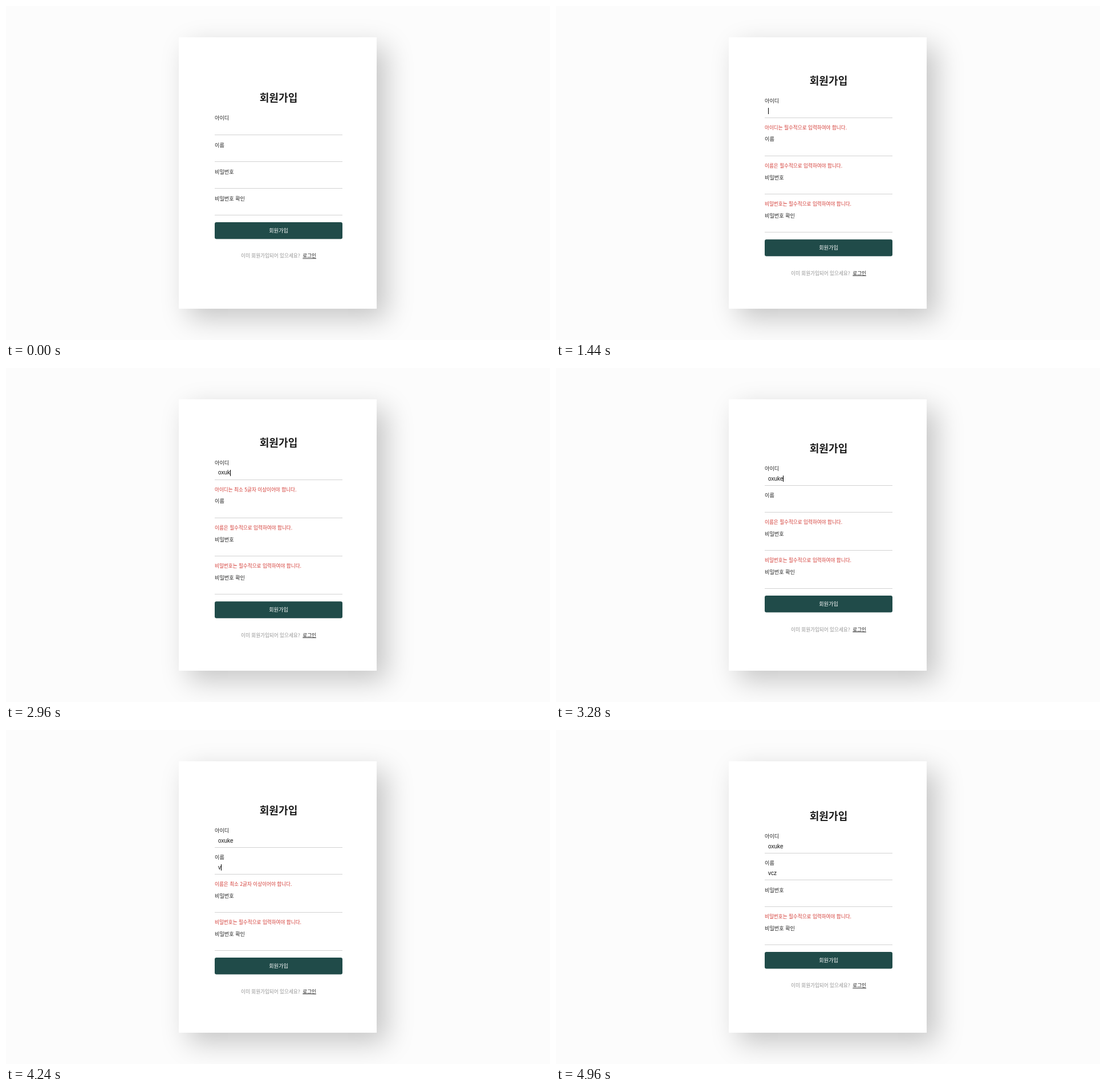
Write an HTML page that moves like this. It is 954x587 px and loops after 5520 ms.

```html
<!DOCTYPE html>
<html lang="ko">
<head>
<meta charset="utf-8">
<title>회원가입</title>
<style>
  html, body { margin: 0; width: 100%; height: 100%; overflow: hidden; background: #fcfcfc; }
  .card {
    position: absolute; left: 303px; top: 55px; width: 347px; height: 477px;
    background: #fff; box-shadow: 17px 17px 45px rgba(0, 0, 0, .22);
  }
  svg { position: absolute; left: 0; top: 0; }
  text { font: 400 8.6px "Noto Sans CJK KR", "Noto Sans CJK", sans-serif; white-space: pre; }
  .title { font-size: 18.1px; font-weight: 700; fill: #1c1c1c; text-anchor: middle; }
  .label { font-size: 9.15px; font-weight: 500; fill: #222; }
  .value { font: 10px "Liberation Sans", Arial, sans-serif; fill: #111; }
  .error { fill: #d33a34; }
  .rule { fill: #d2d2d2; }
  .button { fill: #204b49; }
  .submit { font-size: 9.15px; font-weight: 500; fill: #fff; text-anchor: middle; }
  .hint { fill: #939393; }
  .login { fill: #1c1c1c; text-decoration: underline; }
</style>
</head>
<body>
<div class="card"></div>
<svg width="954" height="587" viewBox="0 0 954 587"></svg>
<script>
const LOOP = 5520;
const LEFT = 366, WIDTH = 224, INSET = 372;
const PITCH = 47.2, ERROR_HEIGHT = 20.1;

const required = subject => subject + ' 필수적으로 입력하여야 합니다.';
const tooShort = (subject, n) => `${subject} 최소 ${n}글자 이상이어야 합니다.`;

const ID = 'oxuke', NAME = 'vcz';
const idEmpty = required('아이디는'), idShort = tooShort('아이디는', 5);
const nameEmpty = required('이름은'), nameShort = tooShort('이름은', 2);
const passEmpty = required('비밀번호는');

// Each step changes only the listed parts of the form.
const steps = [
  [0, { id: 0, name: 0, caret: -1, errors: ['', '', ''] }],
  [640, { errors: [idEmpty, nameEmpty, passEmpty] }],
  [1440, { caret: 0 }],
  [1920, { caret: -1 }],
  [2080, { id: 1, caret: 0, errors: [idShort, nameEmpty, passEmpty] }],
  [2400, { id: 2 }],
  [2720, { id: 3 }],
  [2960, { id: 4 }],
  [3280, { id: 5, errors: ['', nameEmpty, passEmpty] }],
  [3680, { caret: -1 }],
  [3920, { caret: 1 }],
  [4240, { name: 1, errors: ['', nameShort, passEmpty] }],
  [4400, { name: 2, errors: ['', '', passEmpty] }],
  [4560, { name: 3 }],
  [4960, { caret: -1 }]
];

const svg = document.querySelector('svg');

function add(tag, cls, attrs, content = '') {
  const el = document.createElementNS('http://www.w3.org/2000/svg', tag);
  el.setAttribute('class', cls);
  for (const key in attrs) el.setAttribute(key, attrs[key]);
  el.textContent = content;
  svg.append(el);
  return el;
}
const addText = (cls, x, content) => add('text', cls, { x }, content);
const moveTo = (el, y) => el.setAttribute('y', y);

const title = addText('title', 478, '회원가입');
const fields = ['아이디', '이름', '비밀번호', '비밀번호 확인'].map(label => ({
  label: addText('label', LEFT, label),
  value: addText('value', INSET, ''),
  error: addText('error', LEFT, ''),
  rule: add('rect', 'rule', { x: LEFT, width: WIDTH, height: 1 })
}));
const button = add('rect', 'button', { x: LEFT, width: WIDTH, height: 29.5, rx: 3 });
const submit = addText('submit', 478, '회원가입');
const hint = addText('hint', 412, '이미 회원가입되어 있으세요?');
const login = addText('login', 520.3, '로그인');
const caret = add('rect', 'caret', { width: 1, height: 11 });

function render(state) {
  const count = state.errors.filter(Boolean).length;
  const shift = -count * ERROR_HEIGHT / 2;
  const values = [ID.slice(0, state.id), NAME.slice(0, state.name)];

  moveTo(title, 168 + shift);
  caret.style.display = state.caret < 0 ? 'none' : '';

  let y = 226 + shift;
  fields.forEach((field, i) => {
    field.value.textContent = values[i] || '';
    field.error.textContent = state.errors[i] || '';
    moveTo(field.label, y - 25.7);
    moveTo(field.rule, Math.round(y - .3));
    moveTo(field.value, y - 8.4);
    moveTo(field.error, y + 20.9);
    if (i === state.caret) {
      caret.setAttribute('x', Math.round(INSET + field.value.getComputedTextLength() - .2));
      moveTo(caret, Math.round(y - 17));
    }
    y += PITCH + (state.errors[i] ? ERROR_HEIGHT : 0);
  });

  moveTo(button, 380 - shift);
  moveTo(submit, 398.2 - shift);
  moveTo(hint, 442.4 - shift);
  moveTo(login, 442.4 - shift);
}

let shown = -1;
function tick() {
  const time = performance.now() % LOOP;
  const index = steps.filter(([start]) => start <= time).length - 1;
  if (index !== shown) {
    shown = index;
    render(Object.assign({}, ...steps.slice(0, index + 1).map(step => step[1])));
  }
  requestAnimationFrame(tick);
}
tick();
</script>
</body>
</html>
```
